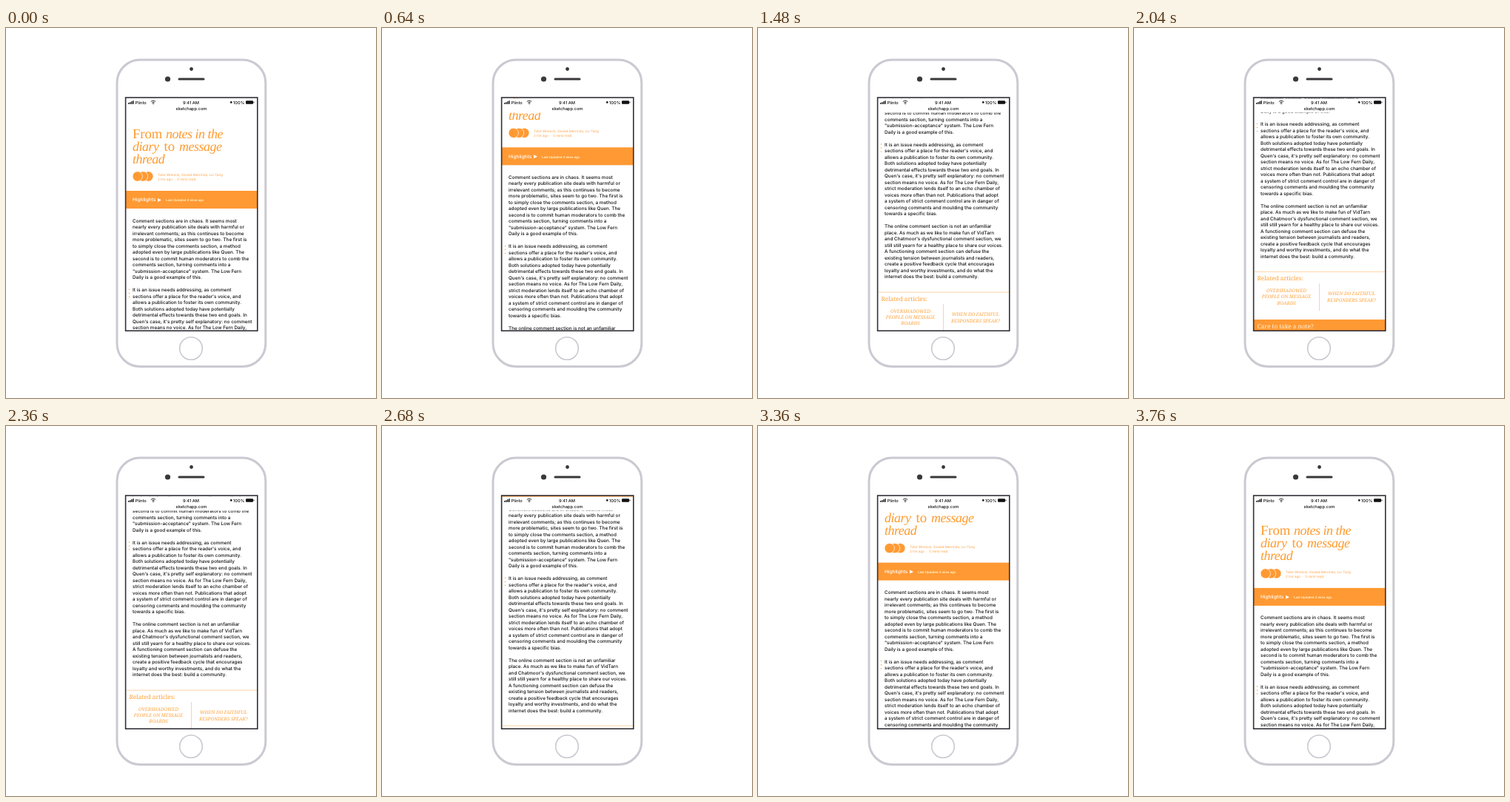
These frames come from a looping animation (500x500 px, 3.8 s). An HTML page:

```html
<!DOCTYPE html>
<html lang="en">
<head>
<meta charset="utf-8">
<title>Article scroll</title>
<style>
  html, body { margin: 0; width: 100%; height: 100%; overflow: hidden; background: #fff; }
  svg { display: block; width: 500px; height: 500px; font-family: Inter, sans-serif; }
  text { white-space: pre; text-rendering: geometricPrecision; }
  .body { font-size: 6.33px; font-weight: 500; fill: #111; }
  .title { font: 18px "Liberation Serif", serif; fill: #ff9a2b; }
  .title .it { font-style: italic; letter-spacing: -.5px; }
  .title .ro { font-size: 18.6px; }
  .meta { font-size: 4.5px; fill: #ffa145; }
  .serif { font: 8.2px "Noto Serif", serif; fill: #ff9f35; }
  .link { font: italic 6.3px "Noto Serif", serif; fill: #ff9f35; text-anchor: middle; }
  .status { font-size: 5.7px; font-weight: 500; fill: #111; }
  .mid { text-anchor: middle; }
  .hl { font-size: 6.5px; font-weight: 500; fill: #fff; }
  .upd { font-size: 4.3px; font-weight: 600; fill: #fff6cf; }
</style>
</head>
<body>
<svg viewBox="0 0 500 500">
  <defs>
    <clipPath id="view"><rect x="162" y="94" width="178" height="315"/></clipPath>
  </defs>

  <!-- phone -->
  <rect x="150" y="43" width="200.8" height="414.5" rx="31" fill="#fff" stroke="#cbc9d1" stroke-width="3"/>
  <g fill="#3a383b">
    <circle cx="250.5" cy="55.5" r="2.4"/>
    <circle cx="218.5" cy="69" r="3.6"/>
    <rect x="232.5" y="67.4" width="36" height="3.2" rx="1.6"/>
  </g>
  <circle cx="250" cy="433" r="15.3" fill="#fff" stroke="#cbc9d1" stroke-width="1.6"/>

  <!-- page -->
  <g clip-path="url(#view)">
    <g id="page">
      <text class="title"><tspan class="ro" x="171" y="148.5">From</tspan><tspan class="it" x="216">notes in the</tspan><tspan class="it" x="171" y="165.5">diary</tspan><tspan class="ro" x="213.5">to</tspan><tspan class="it" x="234">message</tspan><tspan class="it" x="171" y="182.5">thread</tspan></text>
      <g fill="#ff9a33" stroke="#fff" stroke-width=".7">
        <circle cx="192.3" cy="200.5" r="6.7"/>
        <circle cx="185" cy="200.5" r="6.7"/>
        <circle cx="177.7" cy="200.5" r="6.7"/>
      </g>
      <text class="meta" x="205" y="199.9">Tobe Wrenick, Osvald Merrindo, Lio Tang</text>
      <text class="meta" x="205" y="206">2 hrs ago  ·  5 mins read</text>

      <rect x="162" y="220" width="178" height="24" fill="#ff9933"/>
      <text class="hl" x="171" y="234.4">Highlights</text>
      <path d="M205 229.9l5 2.5-5 2.5z" fill="#fff"/>
      <text class="upd" x="216" y="234.2">Last Updated 2 mins ago</text>

      <g id="body" class="body"></g>
      <g fill="#ffa640">
        <circle cx="166.5" cy="353.2" r=".75"/>
        <circle cx="166.5" cy="358.2" r=".75"/>
        <circle cx="166.5" cy="363.2" r=".75"/>
      </g>

      <path d="M163 553.2H340" stroke="#ffcf9c" stroke-width=".9"/>
      <text class="serif" x="166.5" y="565.2">Related articles:</text>
      <path d="M250.5 569V606" stroke="#ffc9a8" stroke-width=".9"/>
      <g id="links" class="link"></g>
      <rect x="162" y="617.7" width="178" height="40" fill="#ff9933"/>
      <text class="serif" x="166.5" y="629.4" style="fill:#fff3d6">Care to take a note?</text>
    </g>

    <!-- status bar -->
    <rect x="162" y="95.6" width="178" height="18.8" fill="#fff"/>
    <g fill="#111">
      <rect x="165" y="101" width="1.4" height="1.8"/>
      <rect x="167.1" y="100.2" width="1.4" height="2.6"/>
      <rect x="169.2" y="99.2" width="1.4" height="3.6"/>
      <rect x="171.3" y="98.2" width="1.4" height="4.6"/>
      <circle cx="199" cy="102.3" r=".8"/>
      <circle cx="304.3" cy="100.4" r="1.3"/>
      <rect x="324" y="98.2" width="10" height="4.5" rx="1"/>
      <rect x="334.5" y="99.6" width=".9" height="1.8"/>
    </g>
    <path d="M195.8 99.6a4.5 4.5 0 0 1 6.4 0M197.3 101.1a2.4 2.4 0 0 1 3.4 0" fill="none" stroke="#111" stroke-width=".9"/>
    <text class="status" x="174.5" y="102.8">Plinto</text>
    <text class="status mid" x="250" y="102.8">9:41 AM</text>
    <text class="status" x="307" y="102.8">100%</text>
    <text class="status mid" x="250.5" y="110.6">sketchapp.com</text>
  </g>
  <rect x="161.6" y="94" width="178.2" height="315.2" fill="none" stroke="#323038" stroke-width="1.6"/>
</svg>

<script>
const article = `Comment sections are in chaos. It seems most
nearly every publication site deals with harmful or
irrelevant comments; as this continues to become
more problematic, sites seem to go two. The first is
to simply close the comments section, a method
adopted even by large publications like Quen. The
second is to commit human moderators to comb the
comments section, turning comments into a
"submission-acceptance" system. The Low Fern
Daily is a good example of this.

It is an issue needs addressing, as comment
sections offer a place for the reader's voice, and
allows a publication to foster its own community.
Both solutions adopted today have potentially
detrimental effects towards these two end goals. In
Quen's case, it's pretty self explanatory: no comment
section means no voice. As for The Low Fern Daily,
strict moderation lends itself to an echo chamber of
voices more often than not. Publications that adopt
a system of strict comment control are in danger of
censoring comments and moulding the community
towards a specific bias.

The online comment section is not an unfamiliar
place. As much as we like to make fun of VidTarn
and Chatmoor's dysfunctional comment section, we
still still yearn for a healthy place to share our voices.
A functioning comment section can defuse the
existing tension between journalists and readers,
create a positive feedback cycle that encourages
loyalty and worthy investments, and do what the
internet does the best: build a community.`;

const byId = id => document.getElementById(id);

function addLines(parent, lines, x, y, step) {
  lines.forEach((line, i) => {
    const el = document.createElementNS(parent.namespaceURI, 'text');
    el.setAttribute('x', x);
    el.setAttribute('y', y + i * step);
    el.textContent = line;
    parent.append(el);
  });
}

addLines(byId('body'), article.split('\n'), 171, 262.5, 8.5);
addLines(byId('links'), ['OVERSHADOWED', 'PEOPLE ON MESSAGE', 'BOARDS'], 206, 580.7, 8.4);
addLines(byId('links'), ['WHEN DO FAITHFUL', 'RESPONDERS SPEAK?'], 294, 585.2, 8.4);

const LOOP = 3800, TURN = 1920, STEP = 40, TRAVEL = 226.3;
const page = byId('page');

// Eased scroll down, then the same way back; the loop ends one step early.
function draw() {
  const t = Math.floor((performance.now() % LOOP) / STEP) * STEP;
  const u = 1 - Math.abs(t - TURN) / TURN;
  const scroll = TRAVEL * u * u * (3 - 2 * u);
  page.setAttribute('transform', `translate(0 ${-scroll.toFixed(2)})`);
  requestAnimationFrame(draw);
}
draw();
</script>
</body>
</html>
```
